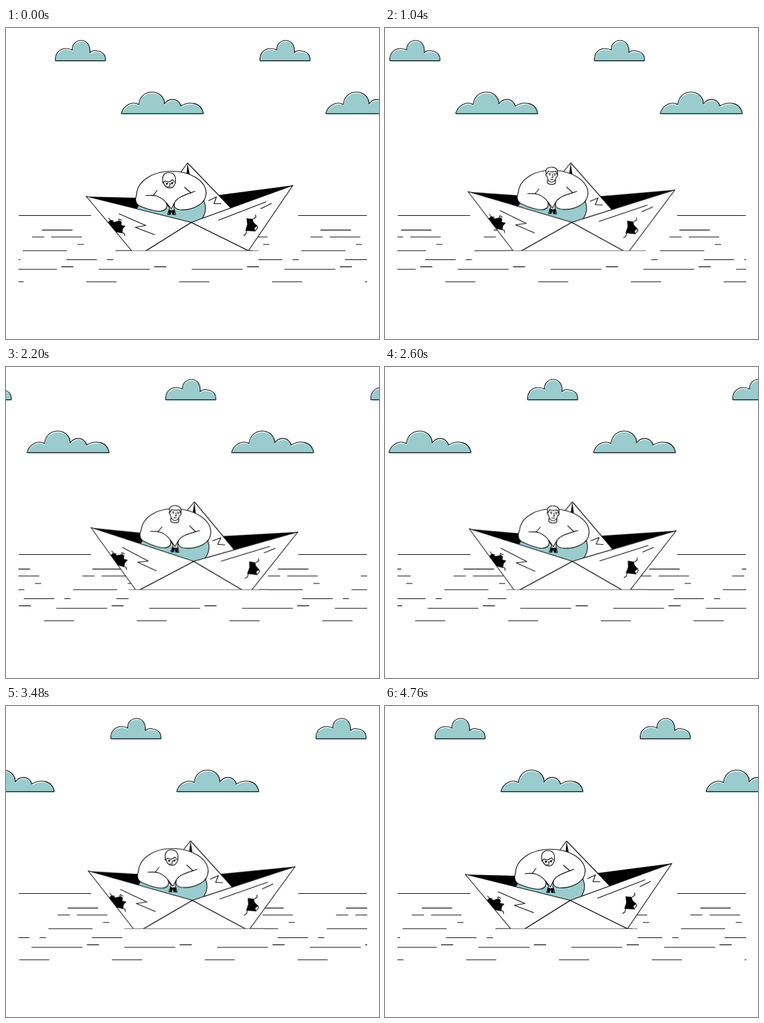
These frames come from a looping animation (600 px wide and 500 px high, 4.8 s). An HTML page:

```html
<!DOCTYPE html>
<html lang="en">
<head>
<meta charset="utf-8">
<title>Paper boat</title>
<style>
  html, body { margin: 0; width: 100%; height: 100%; overflow: hidden; background: #fff; }
  svg { display: block; width: 600px; height: 500px; }
  .line { fill: none; stroke: #000; stroke-width: 1.15; stroke-linejoin: round; stroke-linecap: round; }
  .paper { fill: #fff; stroke: #000; stroke-width: 1.15; stroke-linejoin: round; }
  .white { fill: #fff; }
  .teal { fill: #9acccd; }
  .water { fill: none; stroke: #000; stroke-width: 1.2; }

  .clouds, .waves, .boat, .hide, .head, .down, .up { animation: 4.8s linear infinite; }
  .clouds { animation-name: clouds; }
  .waves { animation-name: waves; }
  .boat { animation-name: rock; transform-origin: 301px 367px; }
  .hide { animation-name: slide; }
  .head { animation-name: nod; }
  .down { animation-name: down; }
  .up { animation-name: up; }

  @keyframes clouds { to { transform: translateX(-330.7px); } }
  @keyframes waves { to { transform: translateX(-149.3px); } }
  @keyframes rock {
    0% { transform: rotate(0deg); animation-timing-function: cubic-bezier(.4, 0, .63, 1); }
    40% { transform: rotate(4.62deg); animation-timing-function: cubic-bezier(.35, .25, .68, .92); }
    100% { transform: rotate(0deg); }
  }
  @keyframes slide {
    0% { transform: translateX(0); animation-timing-function: cubic-bezier(.3, .5, .6, 1); }
    40% { transform: translateX(18px); animation-timing-function: cubic-bezier(.4, .2, .75, .7); }
    100% { transform: translateX(0); }
  }
  @keyframes nod {
    0%, 11% { transform: translateY(0); animation-timing-function: ease-in-out; }
    20%, 58% { transform: translateY(-7.5px); animation-timing-function: ease-in-out; }
    68%, 100% { transform: translateY(0); }
  }
  @keyframes down {
    0%, 15% { opacity: 1; }
    16%, 62.5% { opacity: 0; }
    63.5%, 100% { opacity: 1; }
  }
  @keyframes up {
    0%, 15% { opacity: 0; }
    16%, 62.5% { opacity: 1; }
    63.5%, 100% { opacity: 0; }
  }
</style>
</head>
<body>
<svg viewBox="0 0 600 500">
  <defs>
    <path id="small" d="M79.5 52.5C78.500 40 87 33 97 33C101 33 104 34 106.500 35.500C106 27 112 20 121 20C130 20 136 28 135 39.500C139 36 144 36 147 37C156 38 161 44 160 52.500Z"/>
    <path id="large" d="M185.500 137.500C189 124 203 117 213.500 123C215 110 224 103 235 103C247 103 255 112 255 122C262 112 277 112 281.500 125.500C293 118 314 118 317.500 137.500Z"/>
    <g id="sky">
      <g class="teal" transform="translate(.5 2)"><use href="#small"/><use href="#large"/></g>
      <g class="line"><use href="#small"/><use href="#large"/></g>
    </g>
    <path id="wave" d="M58 324.900h49M42 336h19.500M73 336h49M115 348h10M27 358h71M97 372.500h49M13 372.500h10M89 383.900h19.500M0 388h82M-20 408h48.500"/>
    <g id="wave2"><use href="#wave"/><use href="#wave" x="149.300"/></g>
    <g id="wave4"><use href="#wave2"/><use href="#wave2" x="298.600"/></g>
    <clipPath id="sea"><path d="M20.500 310H580.500V420H20.500Z"/></clipPath>
  </defs>

  <g class="clouds">
    <use href="#sky"/><use href="#sky" x="329"/><use href="#sky" x="659"/>
  </g>

  <path class="water" d="M20.500 301.500H137M470 301.500H580.500"/>
  <g clip-path="url(#sea)">
    <g class="waves water"><use href="#wave4" x="-149.300"/><use href="#wave4" x="447.900"/></g>
  </g>

  <g class="boat">
    <path d="M129 271L230 273.500L298 312.500ZM461.500 253L335 269.500L298 312.500Z"/>
    <path class="paper" d="M281 232L292 217L362 289.500L298 312.500L270 260Z"/>
    <path d="M292 217L290.500 234L296 238Z"/>
    <path class="line" d="M326 277.500L338.500 271.500L334.500 282.500L346 282.500"/>

    <!-- sitter -->
    <path class="paper" d="M210 268C211 246 236 230.300 265 230.300C297 230.300 321 245 322 265L318 279L298 312L213 289Z"/>
    <path class="teal" d="M210 291L216 284L256 284L266 296L274 286L317 278C324 288 321 298 315 307L298 313Z"/>
    <path class="line" d="M318 278C323 288 321 299 315 307"/>
    <path class="white" d="M210 268C207 277 209 284 217 287C227 291 238 295 248 294.500C256 294 259 290 259 285C258 279 251 273 242 270L225 262Z"/>
    <path class="line" d="M210 268C207 277 209 284 217 287C227 291 238 295 248 294.500C256 294 259 290 259 285C258 279 251 273 242 270C237 268.500 231 269 225 269.500M237 269L243 261"/>
    <path class="white" d="M322 265C322 274 318 280 310 285C300 291 288 293 279 292C272 291 269 286 271 281C275 272 292 269 305 262Z"/>
    <path class="line" d="M322 265C322 274 318 280 310 285C300 291 288 293 279 292C272 291 269 286 271 281C275 272 289 268 304 262.500M287 256L297 264.500"/>
    <path class="paper" d="M258 281L263 290L260 300H264L266 293L268 300H273L270 290L271 281L266 291Z"/>
    <path d="M262 292.500H265V300H261.500ZM267 292.500H270.500L271.500 300H268Z"/>

    <g class="head">
      <g class="down">
        <path class="paper" d="M252.500 247C250.500 238 254 232.500 262 232.500C270 232.500 273.500 238 272.500 246C273.500 249 271 251 270.500 253C268 257.500 264 257.500 261.500 257C257 256 255 253 254 250C252 249.500 251.500 248 252.500 247Z"/>
        <path class="line" d="M253 248.500L256 246L262 247.500L268 244L271 247.500M263.500 249.500L264 253L262.500 253M260 255.200H264.500M257 249L260.500 249.500M265.500 249L269 248.500"/>
        <path d="M257.500 249.500h2.400v2.200h-2.400ZM265.700 249h2.400v2.200h-2.400Z"/>
      </g>
      <g class="up">
        <g transform="translate(0 7.500)">
          <path class="paper" d="M256 246V250C257 254 268 254 269 250V246Z"/>
          <path class="paper" d="M253.500 236C251.500 230 254 226 261 225.500C268 224.500 273 229 271.500 236C273 238 271.500 240 270 240.500C269 246 266 249 262.500 249.500C258 249 256 246 255 240.500C252.500 239 252.500 237 253.500 236Z"/>
          <path class="line" d="M254 237L256.500 232C261 234 266 232 269 231.500L271 237M263.500 237L264.500 242L262.500 242M260.500 245H265M257.500 236L260.500 235.500M265.500 235.500L268.500 236"/>
          <path d="M258.500 237h1.600v1.800h-1.600ZM266.500 237h1.600v1.800h-1.600Z"/>
        </g>
      </g>
    </g>

    <!-- hull -->
    <path class="paper" d="M298 312.500L210 367.500L390 358Z"/>
    <path class="paper" d="M129 270.500L298 312.500L210 367.500Z"/>
    <path class="paper" d="M461.500 253L298 312.500L390 358Z"/>
    <path class="line" d="M182 298.700L225 317.500L208 320.500L239 332.200M342 309L418 279.500M410 290.500L427 282"/>
    <path d="M164 312.500L168 308.500L174 312L183 309.500L186 312L185.500 317L192 318L188 323L187 330L177 328Z"/>
    <path d="M387 306L397 307L398 312L404 318L399.500 322L402 327L385 326L388 316Z"/>
    <path class="line" d="M165 305.500L168 309L173 310M181 309L182 307L186 309M187 329L190 330L191 334M398 307L402 304L401.500 300.500M403 317L405 321L402 325M387 326L386 331L382.500 333.500"/>
  </g>

  <g class="hide">
    <path class="white" d="M180 358H406V377H180Z"/>
    <path d="M180 358H406" stroke="#000" stroke-width=".6"/>
  </g>
</svg>
</body>
</html>
```
